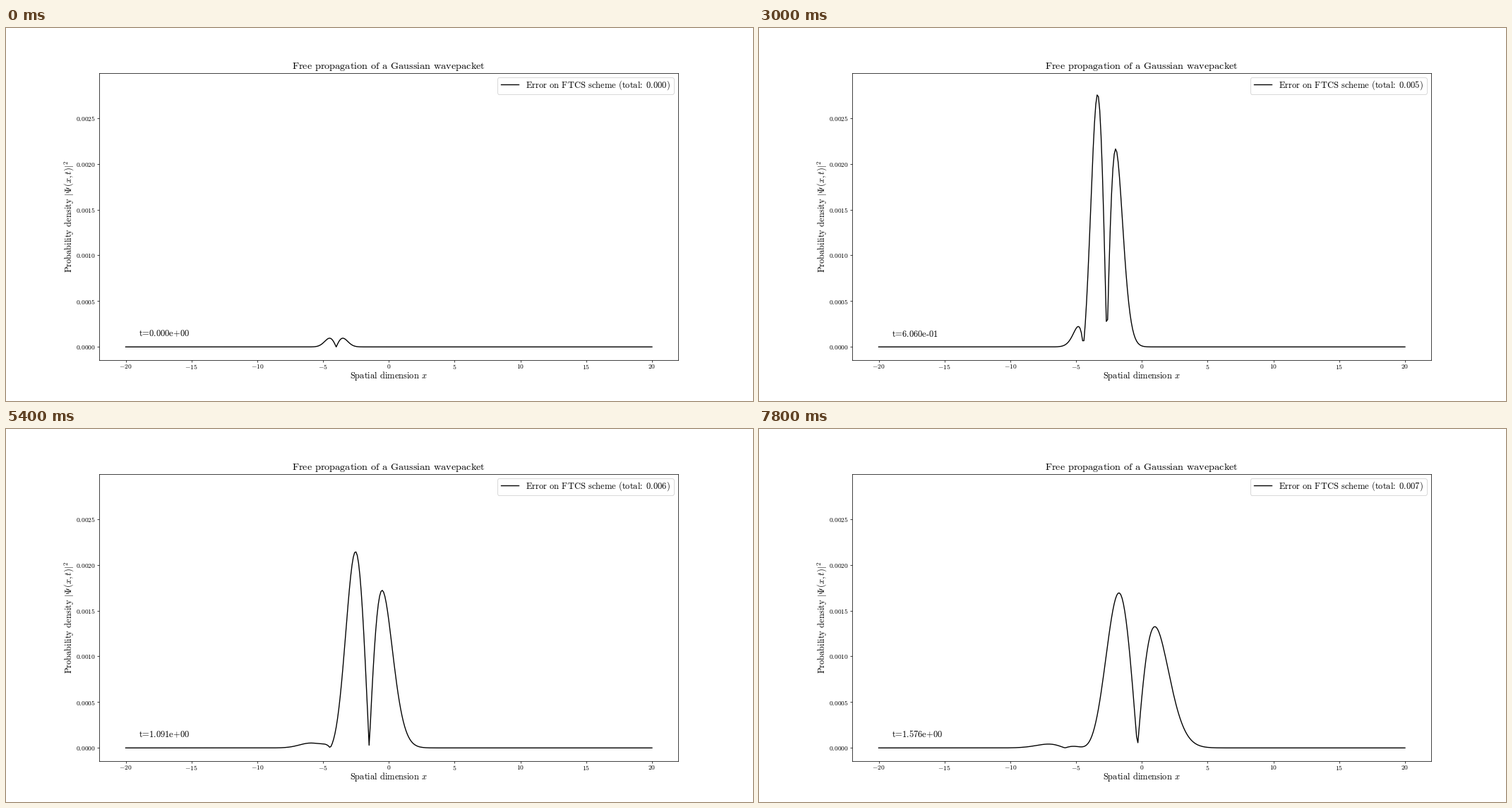
These frames come from a looping animation (1058x529 px, 8 s). A matplotlib script:

```python
import numpy as np
import matplotlib.pyplot as plt
from matplotlib.animation import FuncAnimation
from matplotlib.lines import Line2D
from matplotlib.patches import FancyBboxPatch
from matplotlib.transforms import Affine2D

plt.rcParams.update({"mathtext.fontset": "cm", "font.family": "Liberation Serif"})

WIDTH, HEIGHT, DPI = 1058, 529, 66.125
FRAMES, INTERVAL = 40, 200
X0, K0 = -4.0, 1.0           # start and wave number of the packet
DT, T_END, SHOTS = 1e-4, 4.0, 100
LABEL_SIZE, TITLE_SIZE, TICK_SIZE = 13.6, 15.5, 10.4
PEAK = 0.00285

x = np.linspace(-20, 20, 401)
dx = x[1] - x[0]


def roman(text):
    """Upright Computer Modern text, with a wider space after a colon."""
    parts = []
    for word in text.split():
        parts.append(r"\text{%s}" % word)
        parts.append(r"\hspace{0.5}" if word.endswith(":") else r"\hspace{0.38}")
    return "".join(parts[:-1])


def exact_density(t):
    spread = 1 + 4 * t**2
    return np.sqrt(2 / np.pi / spread) * np.exp(-2 * (x - X0 - K0 * t) ** 2 / spread)


def simulate():
    """Forward-time centred-space run; returns shown times and density errors."""
    total_steps = round(T_END / DT)
    shown = [i * total_steps // (SHOTS - 1) for i in range(FRAMES)]
    psi = (2 / np.pi) ** 0.25 * np.exp(-((x - X0) ** 2) + 1j * K0 * x)
    rate = 0.5j * DT / dx**2
    errors, done = [], 0
    for n in shown:
        while done <= n:
            psi[1:-1] += rate * (psi[2:] - 2 * psi[1:-1] + psi[:-2])
            done += 1
        errors.append(np.abs(np.abs(psi) ** 2 - exact_density(n * DT)))
    return np.array(shown) * DT, errors


def legend_label(total):
    return f"${roman(f'Error on FTCS scheme (total: {total:.3f})')}$"


def time_label(t):
    # the tiny factor makes exact halves round up
    return f"${roman(f't={t * (1 + 1e-9):.3e}')}$"


times, errors = simulate()

fig, ax = plt.subplots(figsize=(WIDTH / DPI, HEIGHT / DPI), dpi=DPI)
fig.subplots_adjust(left=0.125, right=0.9, bottom=0.11, top=0.8795)
ax.set_xlim(-22, 22)
ax.set_ylim(-0.05 * PEAK, 1.05 * PEAK)
pixels = Affine2D().scale(1, -1).translate(0, HEIGHT)   # origin at top left


def label(px, py, text, **style):
    return ax.text(px, py, text, transform=pixels, fontsize=LABEL_SIZE, **style)


xticks = range(-20, 21, 5)
yticks = np.arange(6) * 0.0005
ax.set_xticks(xticks, [f"${v}$" for v in xticks], fontsize=TICK_SIZE)
ax.set_yticks(yticks, [f"${roman(f'{v:.4f}')}$" for v in yticks], fontsize=TICK_SIZE)
ax.tick_params(axis="x", pad=1.3)
ax.tick_params(axis="y", pad=2.5)

ax.set_title(f"${roman('Free propagation of a Gaussian wavepacket')}$", fontsize=TITLE_SIZE)
label(542.2, 497.2, f"${roman('Spatial dimension')}" + r"\hspace{0.38}x$", ha="center")
label(92.4, 267.1, f"${roman('Probability density')}" + r"\hspace{0.38}|\Psi(x,t)|^2$",
      ha="center", va="baseline", rotation=90, rotation_mode="anchor")

line, = ax.plot(x, errors[0], color="black", lw=1.5)
clock = ax.text(-19, 0.04 * PEAK, time_label(0), fontsize=LABEL_SIZE)

# legend
ax.add_patch(FancyBboxPatch((695.5, 69.9), 250.3, 23.7, transform=pixels,
                            boxstyle="round,pad=0,rounding_size=2.6",
                            fc="white", ec="0.8", lw=1, alpha=0.8, snap=True, zorder=5))
ax.add_line(Line2D([700.6, 726.3], [80.2, 80.2], transform=pixels,
                   color="black", lw=1.5, zorder=6))
legend_text = label(736.2, 84.2, legend_label(0), zorder=6)


def update(i):
    line.set_ydata(errors[i])
    clock.set_text(time_label(times[i]))
    legend_text.set_text(legend_label(errors[i].sum() * dx))
    return line, clock, legend_text


anim = FuncAnimation(fig, update, frames=FRAMES, interval=INTERVAL, repeat=True)
plt.show()
```
